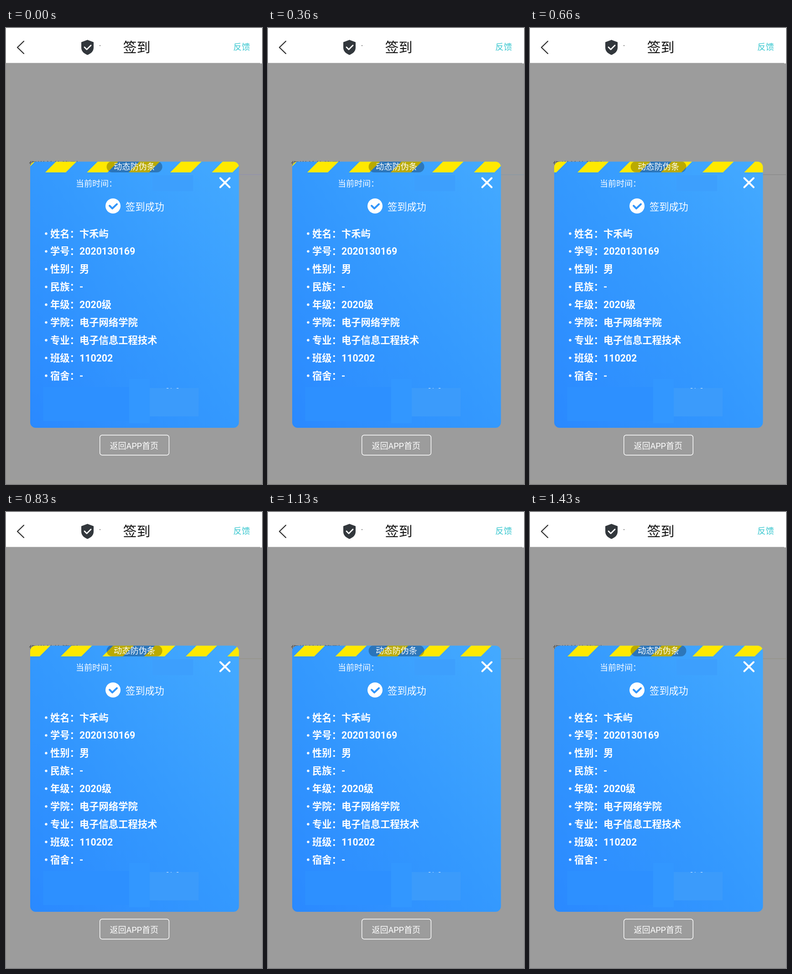
Recreate the animation shown at these times as an HTML page. Size 561 by 998 pixels, loop 1.46 s.

```html
<!DOCTYPE html>
<html lang="zh-CN">
<head>
<meta charset="utf-8">
<title>签到</title>
<style>
  html, body { margin: 0; width: 100%; height: 100%; overflow: hidden; background: #9c9c9c; }
  svg { display: block; width: 100vw; height: 100vh; }
  text { font-family: Roboto, "Noto Sans CJK SC", "Noto Sans CJK", sans-serif; fill: #fff; }
  .line { fill: none; stroke-linecap: round; stroke-linejoin: round; }
</style>
</head>
<body>
<svg viewBox="0 0 561 998" xmlns="http://www.w3.org/2000/svg">
  <defs>
    <linearGradient id="blue" x1="0" y1="1" x2="1" y2="0">
      <stop offset="0" stop-color="#2a89ff"/>
      <stop offset=".5" stop-color="#3499fe"/>
      <stop offset="1" stop-color="#44aaff"/>
    </linearGradient>
    <clipPath id="card"><rect x="53" y="292.5" width="457.5" height="582.5" rx="12"/></clipPath>
    <clipPath id="peek"><rect x="50" y="291" width="110" height="9"/></clipPath>
  </defs>

  <rect width="561" height="998" fill="#9c9c9c"/>
  <path d="M0 0H561V77.5H557V76.5H0Z" fill="#fff"/>

  <!-- header -->
  <path class="line" d="M39 29L25 42.5L39 56" stroke="#333" stroke-width="2.4"/>
  <path d="M178.500 26L192 31V43C192 51 186 56 178.500 59C171 56 165 51 165 43V31Z" fill="#32373c"/>
  <path class="line" d="M172 42L177 47L186 38" stroke="#fff" stroke-width="2.8"/>
  <circle cx="206" cy="38.500" r=".9" fill="#444"/>
  <text x="256.500" y="53" font-size="30" style="fill:#111">签到</text>
  <text x="498" y="48" font-size="18.500" style="fill:#3cc8d0">反馈</text>

  <!-- page behind the card -->
  <g clip-path="url(#peek)"><text x="50" y="306" font-size="18" style="fill:#555">您当前的签到</text></g>
  <path id="rule" d="M510 321H561" stroke-width="1.2"/>

  <g clip-path="url(#card)">
    <rect x="53" y="292" width="458" height="583" fill="url(#blue)"/>
    <rect x="321" y="322" width="89" height="35" fill="#3d9ffd"/>
    <rect x="81.500" y="786" width="188.500" height="74" fill="#2d90ff"/>
    <rect x="270" y="768" width="45" height="97" fill="#3297ff"/>
    <rect x="315" y="788" width="107" height="62" fill="#3b9bfb"/>
    <path d="M352 788.500h4M361 788.500h1.500M374 788.500h4" stroke="#d8ecff" stroke-width="1"/>
    <g id="stripes" fill="#ffe900"></g>
    <rect x="220.500" y="291.500" width="122" height="24.500" rx="12.200" opacity=".27"/>
  </g>
  <text x="236" y="309.500" font-size="18.200">动态防伪条</text>
  <text x="153" y="347" font-size="18">当前时间：</text>
  <path class="line" d="M469.500 328.500L490 348.500M490 328.500L469.500 348.500" stroke="#fff" stroke-width="4"/>

  <circle cx="234.500" cy="389.500" r="16.500" fill="#fff"/>
  <path class="line" d="M227 389L233 395L243 385.500" stroke="#3296fb" stroke-width="4"/>
  <text x="262" y="398.500" font-size="21.200">签到成功</text>

  <g id="rows" font-size="21.300" font-weight="700"></g>

  <rect x="205.700" y="891" width="151.600" height="43.700" rx="5" fill="none" stroke="#fff" stroke-width="1.400"/>
  <text x="227.500" y="920.500" font-size="18">返回APP首页</text>
</svg>
<script>
const NS = "http://www.w3.org/2000/svg";
const LOOP = 1460, PERIOD = 91.3;
const stripes = document.getElementById("stripes");
const rows = document.getElementById("rows");
const rule = document.getElementById("rule");

function add(parent, tag, attrs, text = "") {
  const el = document.createElementNS(NS, tag);
  for (const key in attrs) el.setAttribute(key, attrs[key]);
  el.textContent = text;
  parent.append(el);
}

const info = [
  ["姓名", "卞禾屿"], ["学号", "2020130169"], ["性别", "男"],
  ["民族", "-"], ["年级", "2020级"], ["学院", "电子网络学院"],
  ["专业", "电子信息工程技术"], ["班级", "110202"], ["宿舍", "-"]
];
info.forEach(([label, value], i) => {
  const y = 450 + i * 38.87;
  add(rows, "circle", { cx: 88, cy: y, r: 2.7, fill: "#fff" });
  add(rows, "text", { x: 97, y: y + 7.6 }, label + "：");
  add(rows, "text", { x: 161, y: y + 7.6 }, value);
});

for (let i = -2; i < 6; i++)
  add(stripes, "path", { d: `M${i * PERIOD} 316l24 -24h45l-24 24z` });

// The screen refreshes after alternating pauses of 30 and 70 ms.
function stepAt(t) {
  if (t < 130) return 0;
  const u = t - 130;
  return 1 + 2 * Math.floor(u / 100) + (u % 100 >= 30 ? 1 : 0);
}

// [step, stripe offset]
const path = [[0, 86], [8, 86], [9, 88], [15, 120], [19, 138], [24, 162], [28, 177.3]];

function offsetAt(step) {
  const i = path.findIndex(p => p[0] > step);
  const [s0, x0] = path[i - 1], [s1, x1] = path[i];
  return x0 + (x1 - x0) * (step - s0) / (s1 - s0);
}

function draw(now) {
  const step = stepAt(now % LOOP);
  stripes.setAttribute("transform", `translate(${offsetAt(step) % PERIOD} 0)`);
  rule.setAttribute("stroke", step < 3 ? "#8f8fb4" : step < 9 ? "#8498a8" : step < 15 ? "#868686" : "#949282");
  requestAnimationFrame(draw);
}
draw(performance.now());
</script>
</body>
</html>
```
